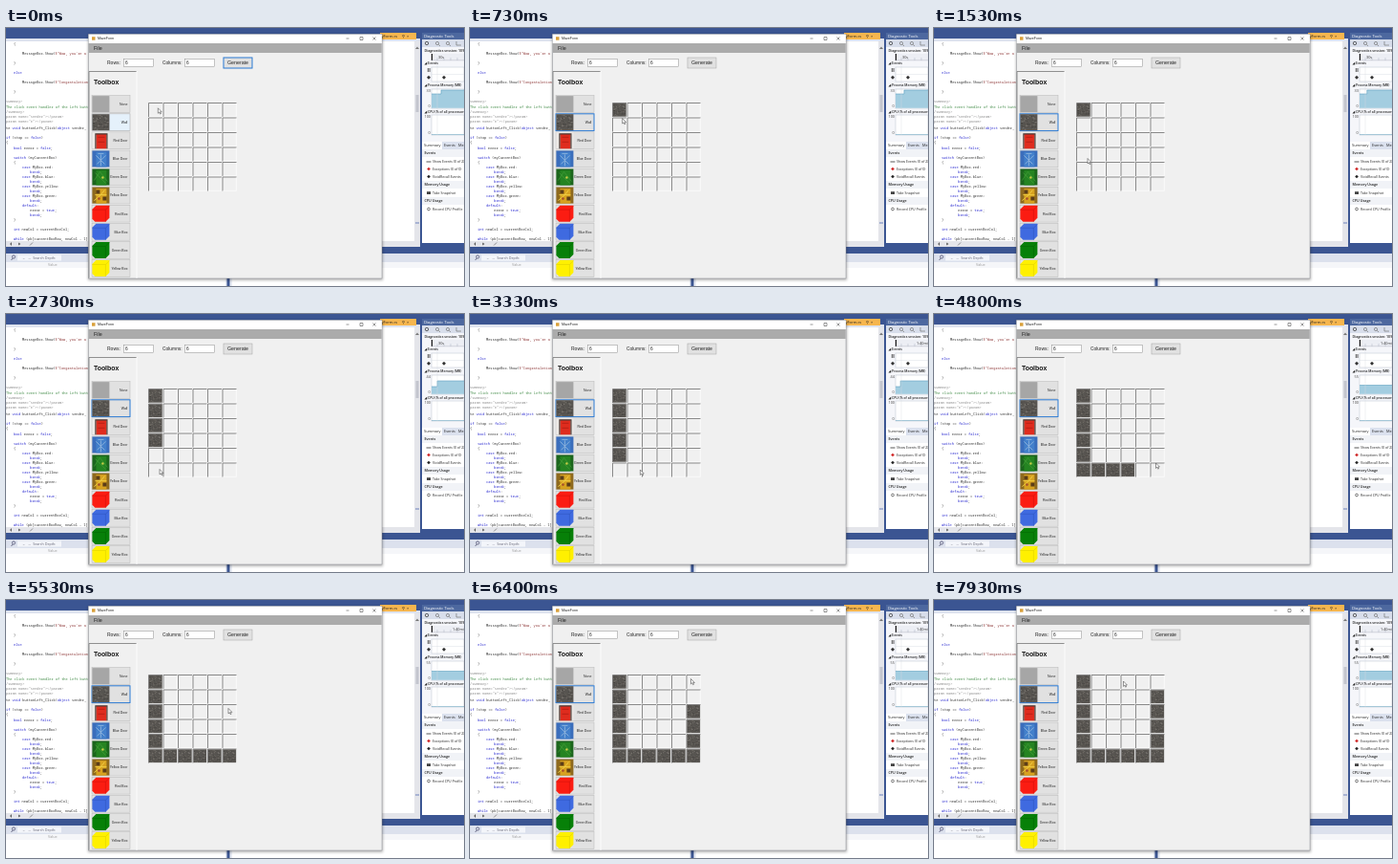
Animation of 480 by 270 pixels, one loop 8000 ms. Source, as an HTML page:

```html
<!DOCTYPE html>
<html lang="en">
<head>
<meta charset="utf-8">
<title>Maze editor</title>
<style>
html, body { margin: 0; width: 100%; height: 100%; overflow: hidden; background: #fff; }
svg { display: block; width: 100vw; height: 100vh; }
text { font-family: "Open Sans", "Noto Sans", sans-serif; white-space: pre; }
.code { font-family: "Noto Sans Mono", "DejaVu Sans Mono", monospace; }
.form text { font-family: "Liberation Sans", sans-serif; }
</style>
</head>
<body>
<svg id="stage" viewBox="0 0 480 270" xmlns="http://www.w3.org/2000/svg"></svg>
<script>
const LOOP = 8000;
const FRAME_BLUE = "#3b5592";
const stage = document.getElementById("stage");

const rect = (x, y, w, h, fill, extra = "") =>
  `<rect x="${x}" y="${y}" width="${w}" height="${h}" fill="${fill}" ${extra}/>`;
const path = (d, fill, extra = "") => `<path d="${d}" fill="${fill}" ${extra}/>`;
const line = (d, color, width = 0.7) => path(d, "none", `stroke="${color}" stroke-width="${width}"`);
const ring = (x, y, r, color) => `<circle cx="${x}" cy="${y}" r="${r}" fill="none" stroke="${color}" stroke-width=".7"/>`;
const diamond = (x, y, r, color) => path(`M${x} ${y - r}l${r} ${r}l${-r} ${r}l${-r} ${-r}Z`, color);
const escape = s => s.replace(/&/g, "&amp;").replace(/</g, "&lt;");
// y is the vertical middle of the lettering
const label = (x, y, markup, size, fill = "#222", extra = "") =>
  `<text x="${x}" y="${y + size * 0.36}" font-size="${size}" fill="${fill}" ${extra}>${markup}</text>`;
const text = (x, y, s, ...style) => label(x, y, escape(s), ...style);

function randomizer(seed) {
  return () => (seed = (seed * 16807) % 2147483647) / 2147483647;
}

function wallTexture() {
  const random = randomizer(4711);
  const tones = ["#7d7973", "#3a3836", "#67625b", "#474440", "#94908a"];
  let out = rect(0, 0, 15, 15, "#575450");
  for (let i = 0; i < 75; i++) {
    const w = 0.5 + random() * 1.3;
    out += rect((random() * 13.4).toFixed(1), (random() * 13.8).toFixed(1),
      w.toFixed(1), (0.4 + random() * 0.7).toFixed(1), tones[i % 5], 'opacity=".75"');
  }
  return out;
}

function codeEditor() {
  const comment = "#3f8a45", tag = "#8a8a8a";
  // [middle y, x, string, colour]
  const lines = [
    [17, 8, "{"], [27, 17, 'MessageBox.Show($"Wow, you\'re a'], [37, 8, "}"],
    [47, 8, "else"], [57, 17, 'MessageBox.Show($"Congratulation'], [67, 8, "}"],
    [77, 0, "summary>", tag], [83, 0, "The click event handler of the Left butt", comment],
    [88, 0, "/summary>", tag], [93, 0, 'param name="sender"></param>', tag],
    [98, 0, 'param name="e"></param>', tag],
    [105, 0, "te void buttonLeft_Click(object sender,"],
    [115, 0, "if (stop == false)"], [120, 0, "{"], [126, 8, "bool error = false;"],
    [136, 8, "switch (myCurrentBox)"], [141, 8, "{"],
    ...["red", "blue", "yellow", "green"].flatMap((name, i) =>
      [[146 + i * 10, 17, `case MyBox.${name}:`], [151 + i * 10, 25, "break;"]]),
    [186, 17, "default:"], [190.5, 25, "error = true;"], [195.5, 25, "break;"], [200.5, 8, "}"],
    [211, 8, "int newCol = currentBoxCol;"], [221, 8, "while (pb[currentBoxRow, newCol - 1]"]
  ];
  const keywords = /\b(if|else|void|object|bool|false|true|switch|case|break|default|int|while)\b/g;
  const highlight = s => escape(s)
    .replace(keywords, '<tspan fill="#2b2bd0">$1</tspan>')
    .replace(/\$".*/, '<tspan fill="#8f3a3a">$&</tspan>');
  let out = rect(0, 0, 434, 225, "#fff");
  out += lines.map(([y, x, s, fill]) =>
    label(x, y, fill ? escape(s) : highlight(s), 3.6, fill || "#333", 'class="code"')).join("");
  out += rect(0, 0, 480, 11, FRAME_BLUE) + rect(0, 11, 434, 3, "#dfe4ef");
  out += rect(392, 5, 38, 7, "#f6b64e") + text(393.5, 8.3, "yForm.cs", 4) + text(415, 8.3, "⚲  ×", 4);
  out += rect(428, 14, 6, 209, "#e4e5ea") + rect(429.5, 70, 3, 18, "#c3c5ce");
  out += path("M429 22L431 19.5L433 22Z", "#777") + line("M429 204H433", "#3757a8");
  out += rect(0, 223, 434, 6, "#e4e5ea");
  out += path("M6 224L4 226L6 228ZM13 224.5L15.5 226L13 227.5Z", "#666") + line("M25 227.5L28 224.5", "#666");
  return out;
}

function bottomPanels() {
  let out = rect(0, 229, 480, 7, FRAME_BLUE) + rect(0, 236, 480, 9, "#dce1ed");
  out += rect(0, 245, 480, 25, "#fff") + rect(0, 245, 480, 6, "#f5f6f9");
  out += rect(12, 237.5, 46, 6, "#f3f5fa");
  out += ring(8, 239.5, 1.6, "#446") + line("M7 241L5.5 243", "#446");
  out += text(17, 240.5, "←  →  Search Depth:", 3.7, "#667") + text(44, 248, "Value", 3.8, "#999");
  return out + rect(230, 236, 7, 34, "#e6eaf3") + rect(231.5, 236, 3, 34, FRAME_BLUE);
}

function diagnostics() {
  const headings = [[37, "◢ Events"], [59.5, "◢ Process Memory (MB)"], [87.7, "◢ CPU (% of all processors)"]];
  const sections = [[131, "Events"], [164, "Memory Usage"], [181, "CPU Usage"]];
  const camera = y => rect(441, y - 1.3, 4, 2.8, "#444");
  const items = [
    [140, "Show Events (0 of 2)", line("M440.5 140H445.5", "#444", 0.9)],
    [147.5, "Exceptions (0 of 0)", diamond(443, 147.5, 1.8, "#cf2525")],
    [155.5, "VividRecall Events", diamond(443, 155.5, 1.8, "#222")],
    [172.5, "Take Snapshot", camera(172.5)],
    [189.5, "Record CPU Profile", ring(443, 189.5, 1.4, "#444")]
  ];
  const chart = (y, h) => rect(446, y, 34, h, "#fff", 'stroke="#bcc2cf" stroke-width=".5"');
  let out = rect(434, 11, 46, 218, FRAME_BLUE) + rect(436, 12, 44, 213, "#f5f6fa");
  out += rect(436, 5, 44, 7, "#4d689f") + text(438, 8.5, "Diagnostic Tools", 4.2, "#fff");
  out += rect(436, 12, 44, 8, "#d8deeb");
  out += ring(441, 16, 1.7, "#333") + ring(452, 16, 1.6, "#777") + ring(463, 16, 1.6, "#777");
  out += line("M453.3 17.2L455 19M464.3 17.2L466 19M472 14V18H477", "#777");
  out += text(438.5, 23.5, "Diagnostics session: 109 seconds", 3.6, "#222", 'font-weight="600"');
  out += rect(446, 27, 34, 7, "#eceef4") + rect(445.8, 27, 1.2, 7, "#111");
  out += line("M446 33.8H480M452 31V34M459 31V34M466 31V34M473 31V34", "#a1a6b5", 0.4);
  out += chart(41, 15) + line("M446 48.5H480", "#d5d8e0", 0.4);
  out += line("M442.3 42V46M444 42V46", "#333", 0.8);
  out += diamond(443, 51.8, 2, "#333") + diamond(459, 51.8, 2, "#333");
  out += chart(64, 20);
  out += `<path id="memory" fill="#a3cde0"/><path id="memoryEdge" fill="none" stroke="#5c9fc0" stroke-width=".6"/>`;
  out += `<text id="memoryScale" x="440.5" y="67" font-size="3.8" fill="#444"></text>` + text(442.5, 82, "0", 3.8, "#444");
  out += chart(91, 21) + line("M446 111.5H480", "#73a9c5", 0.6) + line("M452 34V112", "#d5d8e0", 0.4);
  out += text(438.5, 93, "100", 3.8, "#444") + text(442.5, 110, "0", 3.8, "#444");
  out += headings.map(([y, s]) => text(438.5, y, s, 3.4, "#222", 'font-weight="600"')).join("");
  out += rect(436, 119, 44, 8, "#dbe1ee") + rect(436, 119, 21, 8, "#fff");
  out += text(438, 123, "Summary", 3.9) + text(459, 123, "Events", 3.9) + text(474, 123, "Memory", 3.9);
  out += rect(436, 127, 44, 98, "#fff");
  out += sections.map(([y, s]) => rect(436, y - 4, 44, 8, "#f1f3f7") + text(438.5, y, s, 3.7, "#222", 'font-weight="600"')).join("");
  out += items.map(([y, s, icon]) => icon + text(447, y, s, 3.6)).join("");
  return out + `<text id="ruler" y="31.5" font-size="3.8" fill="#333"></text>`;
}

function door(color, frame, detail) {
  return rect(0, 0, 18, 17, frame) + rect(4, 1.5, 11, 15.5, color) + detail;
}

function cube(color, dark) {
  return path("M0 4L4 0H18V13L14 17H3L0 14Z", color) + line("M0 4.5H14V17M14 4.5L18 .5", dark, 0.5);
}

function toolbox() {
  const items = [
    ["None", rect(0, 0, 18, 17, "#a6a6a6")],
    ["Wall", `<use href="#wall" transform="scale(1.2 1.13)"/>`],
    ["Red Door", door("#df2c1e", "#ece9e6", line("M3.5 17V1.5H15.5V17", "#4a3a35", 1.2) + line("M6 5H13M6 10H13", "#b01c12", 0.8))],
    ["Blue Door", door("#4380cb", "#3a6dbb", line("M9 16V4M9 10L4 5M9 10L14 5M5 14L9 10L13 14M6 3H12", "#8fb4dd", 0.9))],
    ["Green Door", door("#258422", "#1b651c", line("M2 12L8 3L16 13M3 4L14 15", "#409a36", 0.8) + `<circle cx="11" cy="9" r="1.2" fill="#c3cc46"/>`)],
    ["Yellow Door", door("#d7a220", "#8e691d", path("M4 3H8V7H4ZM11 10H15V14H11Z", "#5b3d18") + line("M2 14L8 9L13 3M3 8H15", "#efcd42", 1) + `<circle cx="7" cy="12" r="1.4" fill="#a9522a"/>`)],
    ["Red Box", cube("#fb1c12", "#c9100b")],
    ["Blue Box", cube("#3f6ae0", "#2c52b8")],
    ["Green Box", cube("#078008", "#046105")],
    ["Yellow Box", cube("#fff000", "#d8ca00")]
  ];
  return items.map(([name, art], i) =>
    `<g transform="translate(90 ${(70.7 + i * 19.1).toFixed(1)})">` +
    rect(0, 0, 40, 17.8, "#e1e1e1", `stroke="#b5b5b5" stroke-width=".5" ${i === 1 ? 'id="wallButton"' : ""}`) +
    `<g transform="translate(.4 .4)">${art}</g>` +
    text(37.4, 9, name, 3.5, "#222", 'text-anchor="end"') + "</g>").join("");
}

const CELL = 15.5, GRID_X = 149, GRID_Y = 78;

function grid() {
  let out = "";
  for (let i = 0; i < 36; i++) {
    const x = GRID_X + (i % 6) * CELL, y = GRID_Y + Math.floor(i / 6) * CELL;
    out += line(`M${x + 0.5} ${y + 15}V${y + 0.5}H${x + 15}`, "#7d7d7d", 0.9) +
      line(`M${x + 1} ${y + 14.8}H${x + 14.8}V${y + 1}`, "#fff", 0.7);
  }
  return out;
}

function mazeWindow() {
  const field = x => rect(x, 32.3, 31, 8.2, "#fff", 'stroke="#8c8c8c" stroke-width=".5"') + text(x + 1.5, 36.5, "6", 4.8);
  let out = rect(86, 7, 309, 257, "#000", 'opacity=".3" filter="url(#blur)"');
  out += rect(86.5, 6.5, 307.5, 255.5, "#f0f0f0", 'stroke="#8a8d94" stroke-width=".5"');
  out += rect(86.7, 6.7, 307, 9.3, "#fff") + rect(90, 9.2, 3.5, 3.5, "#d9a13c") + text(96, 11, "MazeForm", 3.6);
  out += line("M356.5 11H359.5M371 9.5H374V12.5H371ZM384.5 9.5L387.5 12.5M387.5 9.5L384.5 12.5", "#333", 0.5);
  out += rect(86.7, 16, 307, 10, "#ababab") + text(92, 21, "File", 5.4);
  out += text(106, 36, "Rows:", 5) + field(123.5) + text(164, 36, "Columns:", 4.9) + field(187.5);
  out += `<rect id="generate" x="228" y="31" width="30" height="11" fill="#e1e1e1"/>` +
    text(243, 36.5, "Generate", 5.3, "#222", 'text-anchor="middle"');
  out += line("M87 261.5V45.5H137", "#777", 0.8) + line("M137 45V262", "#fff", 0.8);
  out += text(92, 57, "Toolbox", 6.9, "#111", 'font-weight="700"');
  return `<g class="form">${out}${toolbox()}${grid()}</g>`;
}

// Walls run down the left side, along the bottom and up the right side.
const wallTimes = [330, 1600, 2000, 2400, 3000, 3400, 3800, 4270, 4600, 4930, 5270, 5670, 5950, 6250, 6800];
function wallCell(i) {
  if (i < 6) return [0, i];
  return i < 11 ? [i - 5, 5] : [5, 15 - i];
}
const walls = wallTimes.map((_, i) => {
  const [col, row] = wallCell(i);
  return `<use class="placed" href="#wall" transform="translate(${GRID_X + 0.9 + col * CELL} ${GRID_Y + 0.9 + row * CELL}) scale(.92)"/>`;
}).join("");

stage.innerHTML = `<defs><g id="wall">${wallTexture()}</g>
  <filter id="blur"><feGaussianBlur stdDeviation="1.5"/></filter></defs>` +
  codeEditor() + bottomPanels() + diagnostics() + mazeWindow() + walls +
  `<path id="cursor" d="M0 0V5.4L1.3 4.3L2.2 6.2L3.1 5.8L2.2 4H3.9Z" fill="#fff" stroke="#333" stroke-width=".5"/>`;

const find = id => document.getElementById(id);
const cursor = find("cursor"), generate = find("generate"), wallButton = find("wallButton"), ruler = find("ruler");
const memory = find("memory"), memoryEdge = find("memoryEdge"), memoryScale = find("memoryScale");
const placed = [...document.querySelectorAll(".placed")];

// [time, x, y]
const cursorPath = [
  [0, 159.3, 83.8], [530, 159.3, 84], [1070, 160.5, 118], [1270, 160.5, 118], [1530, 161, 136.5],
  [1870, 161, 140], [2400, 161, 162.5], [2870, 161, 162.5], [3300, 178, 163], [3670, 198, 163],
  [3800, 200, 163], [4130, 217.5, 162.5], [4530, 232, 162.5], [4800, 232.5, 156], [5100, 233, 137],
  [5470, 233, 113.5], [5700, 233, 113], [6000, 232, 98], [6300, 231.5, 82.5],
  [6730, 231.5, 82.5], [7200, 216, 84], [7600, 198.5, 85], [8000, 198.5, 85]
];

function along(points, t) {
  const i = Math.max(1, points.findIndex(p => p[0] > t));
  const [t0, x0, y0] = points[i - 1], [t1, x1, y1] = points[i];
  const u = (t - t0) / (t1 - t0), e = u * u * (3 - 2 * u);
  return [x0 + (x1 - x0) * e, y0 + (y1 - y0) * e];
}

// [start, axis maximum, left level, right level, step x at start]
const memoryPhases = [[0, 33, 69, 65, 456], [2730, 44, 76, 70, 452], [3700, 44, 72, 72, 447], [4600, 55, 74.5, 74.5, 447]];

function drawMemory(t) {
  const [start, scale, left, right, stepX] = memoryPhases.filter(p => p[0] <= t).pop();
  const x = Math.max(446, stepX - (t - start) / 700);
  const top = `M446 ${left}H${x}V${right}H480`;
  memoryEdge.setAttribute("d", top);
  memory.setAttribute("d", top + "V83.7H446Z");
  memoryScale.textContent = scale;
}

function outline(button, focused) {
  button.setAttribute("stroke", focused ? "#2878d2" : "#adadad");
  button.setAttribute("stroke-width", focused ? 1 : 0.6);
}

function render(t) {
  const [x, y] = along(cursorPath, t);
  cursor.setAttribute("transform", `translate(${x.toFixed(2)} ${y.toFixed(2)})`);
  placed.forEach((wall, i) => wall.setAttribute("visibility", t >= wallTimes[i] ? "visible" : "hidden"));
  const wallChosen = t >= 200;
  outline(generate, !wallChosen);
  outline(wallButton, wallChosen);
  wallButton.setAttribute("fill", wallChosen ? "#e1e1e1" : "#e5f1fb");
  const zoomedOut = t >= 2800;
  ruler.textContent = zoomedOut ? "1:40min" : "30s";
  ruler.setAttribute("x", zoomedOut ? 468 : 453);
  drawMemory(t);
}

function tick(now) {
  render(now % LOOP);
  requestAnimationFrame(tick);
}
render(0);
requestAnimationFrame(tick);
</script>
</body>
</html>
```
